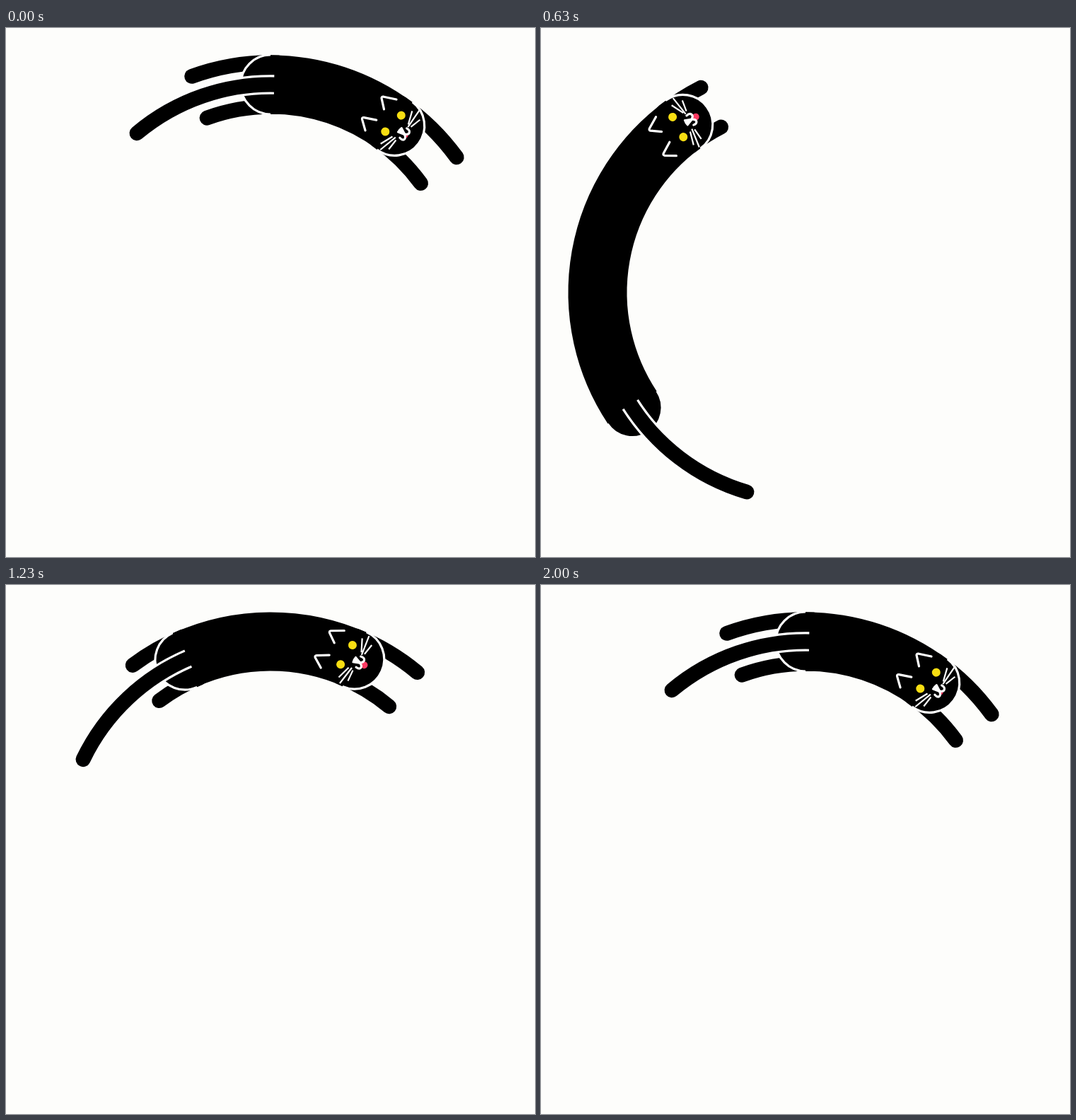
Animation of 748 by 748 pixels, one loop 2.03 s. Source, as an HTML page with a canvas:

```html
<!DOCTYPE html>
<html lang="en">
<head>
<meta charset="utf-8">
<title>Running cat</title>
<style>
  html, body { margin: 0; width: 100%; height: 100%; overflow: hidden; background: #fdfdfb; }
  canvas { display: block; width: 100vw; height: 100vh; }
</style>
</head>
<body>
<canvas id="stage" width="748" height="748"></canvas>
<script>
const ctx = document.getElementById('stage').getContext('2d');
const LOOP = 2030, RUN = 2000, STEP = 100 / 3;
const MID = 374, RADIUS = 294, BODY = 83, LIMB = 21, LEG_GAP = 31.3;
const BG = '#fdfdfb', BLACK = '#000', WHITE = '#fff', YELLOW = '#f8de12', PINK = '#fb3a62';
const HEAD_START = 36.7, TAIL_LENGTH = 40;
const LEAP = 270, SETTLE = 630;

const rad = deg => deg * Math.PI / 180;
const clamp = v => Math.min(1, Math.max(0, v));
const smooth = v => { v = clamp(v); return v * v * (3 - 2 * v); };

// Parameter of the cubic-bezier(1/3, 0, 0, 1) time curve
function curveParam(x) {
  let lo = 0, hi = 1;
  for (let i = 0; i < 40; i++) {
    const s = (lo + hi) / 2;
    if (s * (1 - s) ** 2 + s ** 3 < x) lo = s; else hi = s;
  }
  return (lo + hi) / 2;
}

function hermite(t, t0, p0, v0, t1, p1, v1) {
  const d = t1 - t0, k = (t - t0) / d, k2 = k * k, k3 = k2 * k;
  return p0 * (2 * k3 - 3 * k2 + 1) + v0 * d * (k3 - 2 * k2 + k)
       + p1 * (3 * k2 - 2 * k3) + v1 * d * (k3 - k2);
}

// Degrees left to travel
function rumpLeft(t) {
  const u = 1 - curveParam(t / RUN);
  return 360 * u * u * (3 - 2 * u);
}

function headLeft(t) {
  if (t < LEAP) return 360 - hermite(t, 0, 0, 0, LEAP, 142.7, 0.66);
  if (t < SETTLE) return 360 - hermite(t, LEAP, 142.7, 0.66, SETTLE, 287.2, 0.22);
  const u = 1 - curveParam(t / RUN);
  return 360 * u * u * (1.5 - 0.5 * u);
}

// How far the face sits behind the head centre, as [time, offset]
const FACE = [[0, -3.8], [270, -11], [630, -8], [830, -8], [1230, -13], [1630, -6], [2000, -3.8]];
function faceOffset(t) {
  const i = Math.max(1, FACE.findIndex(k => k[0] >= t));
  const [t0, a] = FACE[i - 1], [t1, b] = FACE[i];
  return a + (b - a) * smooth((t - t0) / (t1 - t0));
}

function ring(radius, from, to, width, color, cap = 'round') {
  if (to <= from) return;
  ctx.beginPath();
  ctx.arc(MID, MID, radius, rad(from - 90), rad(to - 90));
  ctx.lineWidth = width;
  ctx.lineCap = cap;
  ctx.strokeStyle = color;
  ctx.stroke();
}

function legs(from, to) {
  for (const side of [-1, 1]) ring(RADIUS + side * LEG_GAP, from, to, LIMB, BLACK);
}

// Runs draw() with the origin on the ring, x pointing forward
function onRing(angle, draw) {
  ctx.save();
  ctx.translate(MID, MID);
  ctx.rotate(rad(angle));
  ctx.translate(0, -RADIUS);
  draw();
  ctx.restore();
}

function rim(angle, dir) {
  onRing(angle, () => {
    ctx.scale(dir, 1);
    ctx.beginPath();
    ctx.arc(0, 0, 42, -Math.PI / 2, Math.PI / 2);
    ctx.lineWidth = 3.2;
    ctx.lineCap = 'butt';
    ctx.strokeStyle = WHITE;
    ctx.stroke();
  });
}

function dot(x, y, r, color) {
  ctx.beginPath();
  ctx.arc(x, y, r, 0, 2 * Math.PI);
  ctx.fillStyle = color;
  ctx.fill();
}

const EARS = new Path2D('M-19-28.5L-35-19.5Q-37.5-18-36-16L-23-6.5M-21 12L-36.5 21Q-39 22.5-37 24.5L-23 33.5');
const WHISKERS = new Path2D('M22-13L25-29M19-10L15.5-38.5M17-13L8.5-31M18.5 15L19.5 31.5M15.5 12.5L11 40M11.5 14.5L5.7 33.3');
const NOSE = new Path2D('M13-3.5Q12 .8 13 5L22 1.8V0Z');
const MOUTH = new Path2D('M19-7.5C26-9 29-3 22 .8C29 4 28 10 20.5 9');

function face(tongue) {
  dot(1, -16, 6, YELLOW);
  dot(-0.7, 16, 6, YELLOW);
  dot(24 + tongue, 0.8, tongue, PINK);
  ctx.strokeStyle = ctx.fillStyle = WHITE;
  ctx.lineCap = ctx.lineJoin = 'round';
  ctx.lineWidth = 3.2;
  ctx.stroke(EARS);
  ctx.stroke(MOUTH);
  ctx.lineWidth = 2;
  ctx.fill(NOSE);
  ctx.stroke(NOSE);
  ctx.lineCap = 'butt';
  ctx.lineWidth = 2.2;
  ctx.stroke(WHISKERS);
}

function draw(t) {
  const hLeft = headLeft(t), rLeft = rumpLeft(t);
  const head = HEAD_START + 360 - hLeft, rump = 360 - rLeft;
  const tuck = smooth(t / LEAP);
  const headTuck = t < LEAP ? tuck : hLeft / headLeft(LEAP);
  const rumpTuck = t < LEAP ? tuck : clamp(rLeft * 0.31 / 25);
  const tail = rump - TAIL_LENGTH;

  ctx.fillStyle = BG;
  ctx.fillRect(0, 0, 748, 748);

  legs(rump - 20 + 25 * rumpTuck, rump + 2);
  legs(head - 2, head + 17.3 - 24.6 * headTuck);
  ring(RADIUS, rump, head, BODY, BLACK);
  rim(rump, -1);
  rim(head, 1);
  ring(RADIUS, tail, rump + 1, 27.5, WHITE, 'butt');
  ring(RADIUS, tail, rump + 2, LIMB, BLACK);

  onRing(head, () => {
    ctx.translate(faceOffset(t), -1.3);
    ctx.rotate(rad(4.7));
    // The face artwork leans slightly against the direction of travel
    ctx.rotate(rad(0));
    face(2 + 3 * clamp(18 * headTuck));
  });
}

const start = performance.now();
function tick() {
  const t = (performance.now() - start) % LOOP;
  draw(Math.min(RUN, Math.floor((t + 4) / STEP) * STEP));
  requestAnimationFrame(tick);
}
tick();
</script>
</body>
</html>
```
